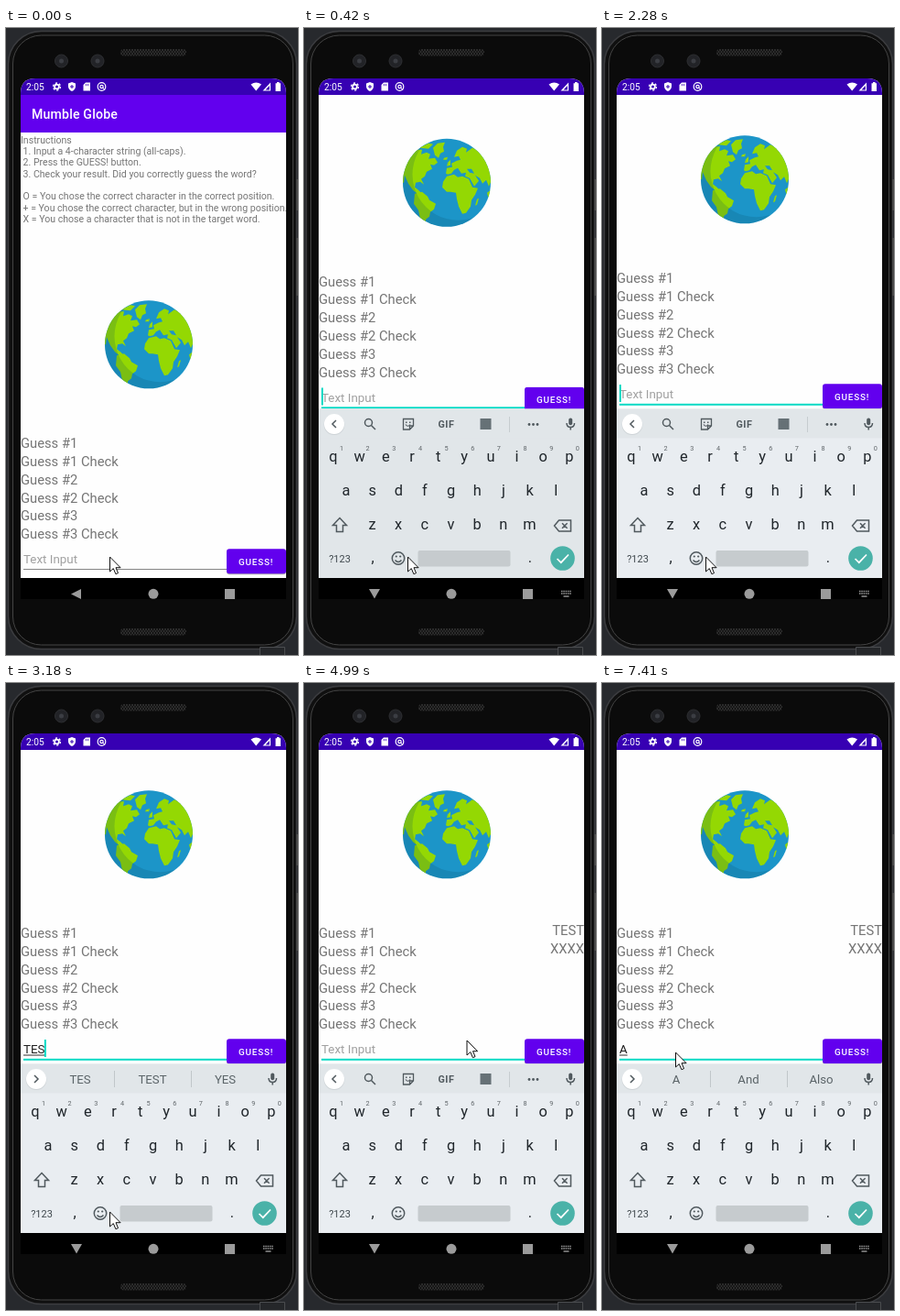
These frames come from a looping animation (319x684 px, 8000 ms). An HTML page:

```html
<!DOCTYPE html>
<html lang="en">
<head>
<meta charset="utf-8">
<style>
  html, body { margin: 0; width: 100%; height: 100%; overflow: hidden; background: #27292d; }
  svg { display: block; width: 319px; height: 684px; }
  text { font-family: Roboto, sans-serif; white-space: pre; }
  .body { font-size: 10.55px; fill: #757575; }
  .guess { font-size: 14.75px; fill: #757575; }
  .field { font-size: 13.4px; }
  .key { font-size: 16.4px; text-anchor: middle; fill: #20262b; }
  .digit { font-size: 7.3px; text-anchor: middle; fill: #5f6569; }
  .word { font-size: 13.2px; text-anchor: middle; fill: #5b6468; }
  .line { fill: none; stroke: #50595e; stroke-width: 1.5; }
</style>
</head>
<body>
<svg viewBox="0 0 319 684">
  <defs>
    <clipPath id="screen"><path d="M16 623V71Q16 55 32 55H290Q306 55 306 71V623Z"/></clipPath>
    <clipPath id="disc"><circle r="48"/></clipPath>
    <clipPath id="buttonShape"><rect x="241" y="568.300" width="65" height="27" rx="3"/></clipPath>
    <pattern id="mesh" width="3" height="4" patternUnits="userSpaceOnUse">
      <path d="M0 0L3 4M3 0L0 4" stroke="#484848" stroke-width=".6"/>
    </pattern>
  </defs>

  <!-- phone -->
  <rect x="2.500" y="3.500" width="315" height="674" rx="36" fill="#101010" stroke="#3c3d40" stroke-width="1.500"/>
  <rect x="7.500" y="8" width="306" height="665" rx="31" fill="#0b0b0b" stroke="#444"/>
  <path d="M318 165V199M318 229V292" stroke="#4a4a4a" stroke-width="2"/>
  <rect x="125" y="23" width="72" height="7.500" rx="3.700" fill="url(#mesh)"/>
  <rect x="125" y="655" width="72" height="7.500" rx="3.700" fill="url(#mesh)"/>
  <g fill="#222327" stroke="#2e2f32">
    <circle cx="60.500" cy="36" r="7"/><circle cx="100" cy="36" r="7"/>
  </g>
  <circle cx="60.500" cy="36" r="2.500" fill="#3b3d43"/><circle cx="100" cy="36" r="2.500" fill="#3b3d43"/>
  <path d="M277.500 684V675.500H304.500V684" fill="#25272a" stroke="#4b4d50"/>

  <g clip-path="url(#screen)">
    <rect x="16" y="55" width="290" height="545" fill="#fefefe"/>

    <g id="content">
      <g transform="translate(156 345.300)">
        <circle r="48" fill="#1c95c8"/>
        <g clip-path="url(#disc)">
          <g fill="#94d803">
            <path d="M-50-12L-43-26-34-36-27-36-28-31-22-33-18-31-20-26-13-27-10-22-14-19-18-20-16-15-22-12-24-7-28-4-25 2-29-1-34 0-35 5-31 8-28 11-31 13-37 8-42 1-46-8-47 0-50 0Z"/>
            <path d="M-30-38L-20-43-15-42-20-37Z"/>
            <path d="M-15-38L-10-43-2-44-4-39-3-34-7-32-9-27-13-30Z"/>
            <path d="M-35 12L-27 10-21 15-19 19-12 23-14 29-18 32-19 37-23 40-23 46-29 39-31 30-36 23Z"/>
            <path d="M-4-1L0-7 8-9 12-6 17-7 24-4 28 5 34 6 31 13 27 19 26 26 21 33 17 34 13 26 11 18 10 11 4 10 0 10-5 5Z"/>
            <path d="M-1-10L0-16 6-17 5-21 11-24 15-25 13-29 8-28 11-35 17-39 22-37 21-33 28-38 38-33 48-18 50-5 46 4 43-3 39 1 36-5 31-8 35-2 30 4 25-5 20-7 21-11 16-10 12-16 8-14 5-10 1-9Z"/>
            <path d="M1-22L4-25 4-19 0-18ZM-3-27L1-28 0-25-4-25ZM33 18L35 17 33 24 31 25ZM44 11L48 8 46 19Z"/>
          </g>
          <path d="M22-15L27-15 30-10 25-11Z" fill="#1c95c8"/>
          <path d="M-52-52H52V52H-52ZM12-59A50 50 0 1 0 13-59Z" fill="#064c60" fill-rule="evenodd" opacity=".18"/>
        </g>
      </g>
      <g id="labels"></g>
      <g id="result" class="guess" text-anchor="end">
        <text x="306" y="455">TEST</text><text x="306" y="474.500">XXXX</text>
      </g>
      <rect id="underline" x="19" width="223"/>
      <text id="hint" class="field" x="19" y="584" fill="#a0a0a0">Text Input</text>
      <text id="typed" class="field" x="19" y="584" fill="#202020"></text>
      <rect id="composing" x="19" y="585.500" height="1" fill="#333"/>
      <rect id="caret" y="569" width="2" height="19" fill="#03dac5"/>
      <rect x="241" y="569.200" width="65" height="27" rx="3" opacity=".3"/>
      <g clip-path="url(#buttonShape)">
        <rect x="241" y="568" width="65" height="28" fill="#6200ee"/>
        <circle id="ripple" cx="275" cy="581" fill="#fff" opacity=".25"/>
      </g>
      <text x="254" y="585.600" font-size="9.880" font-weight="500" letter-spacing=".8" fill="#fff">GUESS!</text>
    </g>

    <g id="appBar">
      <rect x="16" y="73" width="290" height="41" fill="#6200ee"/>
      <text x="28" y="99" font-size="14.110" font-weight="500" letter-spacing=".18" fill="#fff">Mumble Globe</text>
      <g id="instructions" class="body"></g>
    </g>

    <rect x="16" y="55" width="290" height="18" fill="#3700b3"/>
    <g fill="#fff">
      <text x="22" y="67.700" font-size="10.200">2:05</text>
      <circle cx="55.500" cy="64" r="3.300"/>
      <circle cx="55.500" cy="64" r="4" fill="none" stroke="#fff" stroke-width="1.300" stroke-dasharray="2.200 1.990"/>
      <circle cx="55.500" cy="64" r="1.500" fill="#3700b3"/>
      <path d="M72 59L76 60.500V64Q75.500 67.500 72 69 68.500 67.500 68 64V60.500Z"/>
      <path d="M72 62V66M70 64H74" stroke="#3700b3"/>
      <path d="M87 59.500H92V68.500H84.500V62Z"/>
      <path d="M87.500 61V63.200M89.500 61V63.200" stroke="#3700b3" stroke-width=".8"/>
      <circle cx="104.500" cy="64" r="4.300" fill="none" stroke="#fff" stroke-width="1.200"/>
      <circle cx="104.500" cy="64" r="1.700" fill="none" stroke="#fff" stroke-width="1.200"/>
      <path d="M106 65L108 68" stroke="#fff"/>
      <path d="M267.500 61.500Q273.200 57.500 279 61.500L273.200 68.500Z"/>
      <path d="M289 59.500V68.500H280.500Z"/><path d="M287.800 63V67.500H283.500Z" fill="#3700b3"/>
      <path d="M294.500 60.200H296V59H298.500V60.200H300V69H294.500Z"/>
    </g>

    <g id="keyboard">
      <rect id="keysBack" x="16" y="415.500" width="290" height="185"/>
      <rect x="16" y="415.500" width="290" height="32" fill="#e1e6e9"/>
      <circle cx="33" cy="432.800" r="11.300" fill="#b9c0c4" opacity=".5"/>
      <circle cx="33" cy="432" r="11" fill="#fff"/>
      <path id="chevron" class="line" transform="translate(33 432)"/>
      <g id="tools">
        <g class="line">
          <circle cx="70.500" cy="430.500" r="4"/><path d="M73.500 433.500L78 438"/>
          <path d="M108.500 426.500H119.500V434L115.500 438H108.500ZM119.500 434H115.500V438" stroke-width="1.300"/>
          <path d="M111 432.500Q113.500 436 116 432.500" stroke-width="1.200"/>
        </g>
        <path d="M111 429.500H112.500V431H111ZM115 429.500H116.500V431H115Z" fill="#50595e"/>
        <text x="146.500" y="436" font-size="10.800" font-weight="700" letter-spacing=".5" fill="#50595e">GIF</text>
        <rect x="192.500" y="426" width="12" height="12" fill="#667176"/>
        <path d="M224.500 424V441" stroke="#c6cccf"/>
        <g fill="#50595e"><circle cx="246" cy="432.500" r="1.400"/><circle cx="250.500" cy="432.500" r="1.400"/><circle cx="255" cy="432.500" r="1.400"/></g>
      </g>
      <g id="suggestions">
        <path d="M118.500 423V441M202.500 423V441" stroke="#c0c7ca"/>
        <text class="word" x="81" y="437"></text>
        <text class="word" x="160" y="437"></text>
        <text class="word" x="239.500" y="437"></text>
      </g>
      <rect x="289.200" y="425.500" width="4" height="7.800" rx="2" fill="#50595e"/>
      <path class="line" d="M287 431Q287 435.500 291.200 435.500T295.500 431M291.200 435.500V438.500" stroke-width="1.300"/>
      <g id="keys"></g>
      <g class="line">
        <path d="M39 534.500L46.500 542.500H42.500V549.500H35.500V542.500H31.500Z"/>
        <path d="M273.500 543L278.500 537H291.500V549H278.500ZM282 540.200L287.600 545.800M287.600 540.200L282 545.800"/>
        <circle cx="103" cy="578.500" r="6.700"/>
        <path d="M99.500 580.500Q103 584.500 106.500 580.500"/>
      </g>
      <g fill="#50595e"><circle cx="100.800" cy="576.500" r="1.100"/><circle cx="105.200" cy="576.500" r="1.100"/></g>
      <text x="39" y="582.700" font-size="11" text-anchor="middle" fill="#3f484d">?123</text>
      <text class="key" x="75" y="583">,</text><text class="key" x="247" y="583">.</text>
      <rect x="124.500" y="570" width="101" height="17.500" rx="2" fill="#c6cbce"/>
      <circle cx="282.500" cy="578.500" r="13.300" fill="#4ab2a8"/>
      <path d="M276.500 579L280.800 583.200 289 574.500" fill="none" stroke="#fff" stroke-width="1.700"/>
    </g>

    <!-- navigation bar -->
    <rect x="16" y="600" width="290" height="23"/>
  </g>

  <g fill="#9b9b9b">
    <path id="back"/>
    <circle cx="161" cy="617.300" r="5.500"/><rect x="239" y="612" width="11" height="11"/>
    <g id="imeIcon">
      <path d="M281 614.500H292M281 617H292" stroke="#9b9b9b" stroke-width="1.400" stroke-dasharray="1.500 .8"/>
      <path d="M283.500 620H289.500" stroke="#9b9b9b" stroke-width="1.400"/>
    </g>
  </g>

  <path id="mouse" d="M0 0V16L3.800 12.600 6.400 18.700 9 17.600 6.500 11.700H11.600Z" fill="#fff" stroke="#111" stroke-width="1"/>
</svg>

<script>
const $ = id => document.getElementById(id);
const label = (x, y, text, cls = '') => `<text x="${x}" y="${y}" class="${cls}">${text}</text>`;
const show = (id, on) => $(id).style.display = on ? '' : 'none';
const set = (id, name, value) => $(id).setAttribute(name, value);
const move = (id, x, y) => set(id, 'transform', `translate(${x} ${y})`);

$('instructions').innerHTML = [
  'Instructions',
  ' 1. Input a 4-character string (all-caps).',
  ' 2. Press the GUESS! button.',
  ' 3. Check your result. Did you correctly guess the word?',
  '',
  ' O = You chose the correct character in the correct position.',
  ' + = You chose the correct character, but in the wrong position.',
  ' X = You chose a character that is not in the target word.'
].map((s, i) => label(16, 125.5 + i * 12.38, s)).join('');

$('labels').innerHTML = [1, 2, 3].flatMap(n => [`Guess #${n}`, `Guess #${n} Check`])
  .map((s, i) => label(16, 458 + i * 19.85, s, 'guess')).join('');

const keyRow = (letters, x, y) => [...letters].map((c, i) => label(x + i * 28.65, y, c, 'key')).join('');
$('keys').innerHTML = keyRow('qwertyuiop', 32, 473) + keyRow('asdfghjkl', 46, 510) + keyRow('zxcvbnm', 74.5, 547)
  + [...'1234567890'].map((c, i) => label(41 + i * 28.65, 461, c, 'digit')).join('');

// Each entry changes part of the state from its time on.
const LOOP = 8000;
const timeline = [
  [0, { mouse: [113.5, 577], text: '', words: null, shift: 0, focus: 0, ime: 0, keyboard: 0, caret: 0, result: 0, ripple: 0 }],
  [150, { focus: 1, caret: 1 }],
  [270, { ime: 1 }],
  [420, { keyboard: 1, shift: -176.5 }],
  [570, { shift: -180 }],
  [850, { caret: 0 }], [1290, { caret: 1 }], [1750, { caret: 0 }], [2280, { caret: 1 }],
  [2780, { text: 'T', words: ['T', 'The', 'This'] }],
  [2900, { text: 'TE', words: ['TE', 'THE', 'RE'] }],
  [3180, { text: 'TES', words: ['TES', 'TEST', 'YES'] }],
  [3300, { text: 'TEST', words: ['TEST', 'TESTING', 'TESTS'] }],
  [3550, { mouse: [110.5, 578] }],
  [3700, { mouse: [142, 555] }],
  [3820, { mouse: [235, 452], caret: 0 }],
  [3940, { mouse: [294, 402] }],
  [4090, { mouse: [280.5, 394] }],
  [4240, { mouse: [277, 399.5] }],
  [4390, { caret: 1, ripple: 22 }],
  [4540, { text: '', words: ['', '', ''], result: 1, ripple: 45 }],
  [4690, { words: null, ripple: 0, mouse: [271, 403] }],
  [4840, { mouse: [207.5, 404] }],
  [4990, { mouse: [178, 390], caret: 0 }],
  [5110, { mouse: [150, 399] }],
  [5230, { mouse: [123, 405] }],
  [5380, { mouse: [108, 407], caret: 1 }],
  [5500, { mouse: [95, 406] }],
  [5620, { mouse: [84, 404] }],
  [5770, { mouse: [80.5, 403] }],
  [5920, { caret: 0 }], [6450, { caret: 1 }],
  [7010, { text: 'A', words: ['A', 'And', 'Also'] }],
  [7410, { caret: 0 }]
];

function render(time) {
  const s = Object.assign({}, ...timeline.filter(([at]) => at <= time).map(([, change]) => change));

  move('content', 0, s.shift);
  move('mouse', ...s.mouse);
  show('appBar', !s.keyboard);
  show('keyboard', s.keyboard);
  show('imeIcon', s.ime);
  show('result', s.result);
  show('caret', s.caret);
  show('hint', !s.text);
  show('tools', !s.words);
  show('suggestions', s.words);
  set('back', 'd', s.ime ? 'M71 612H83L77 622.500Z' : 'M82 612V623L71 617.500Z');
  set('chevron', 'd', s.words ? 'M-2-4L2 0-2 4' : 'M2-4L-2 0 2 4');
  set('keysBack', 'fill', s.shift === -180 ? '#e9edf1' : '#e1e6e9');
  set('underline', 'fill', s.focus ? '#03dac5' : '#858585');
  set('underline', 'y', s.focus ? 589.8 : 590);
  set('underline', 'height', s.focus ? 2 : 1);
  set('ripple', 'r', s.ripple);

  $('typed').textContent = s.text;
  const width = s.text ? $('typed').getComputedTextLength() : 0;
  set('composing', 'width', width);
  set('caret', 'x', 19 + Math.max(0, width - .7));
  document.querySelectorAll('.word').forEach((el, i) => el.textContent = s.words ? s.words[i] : '');
}

function tick() {
  render(performance.now() % LOOP);
  requestAnimationFrame(tick);
}
tick();
</script>
</body>
</html>
```
